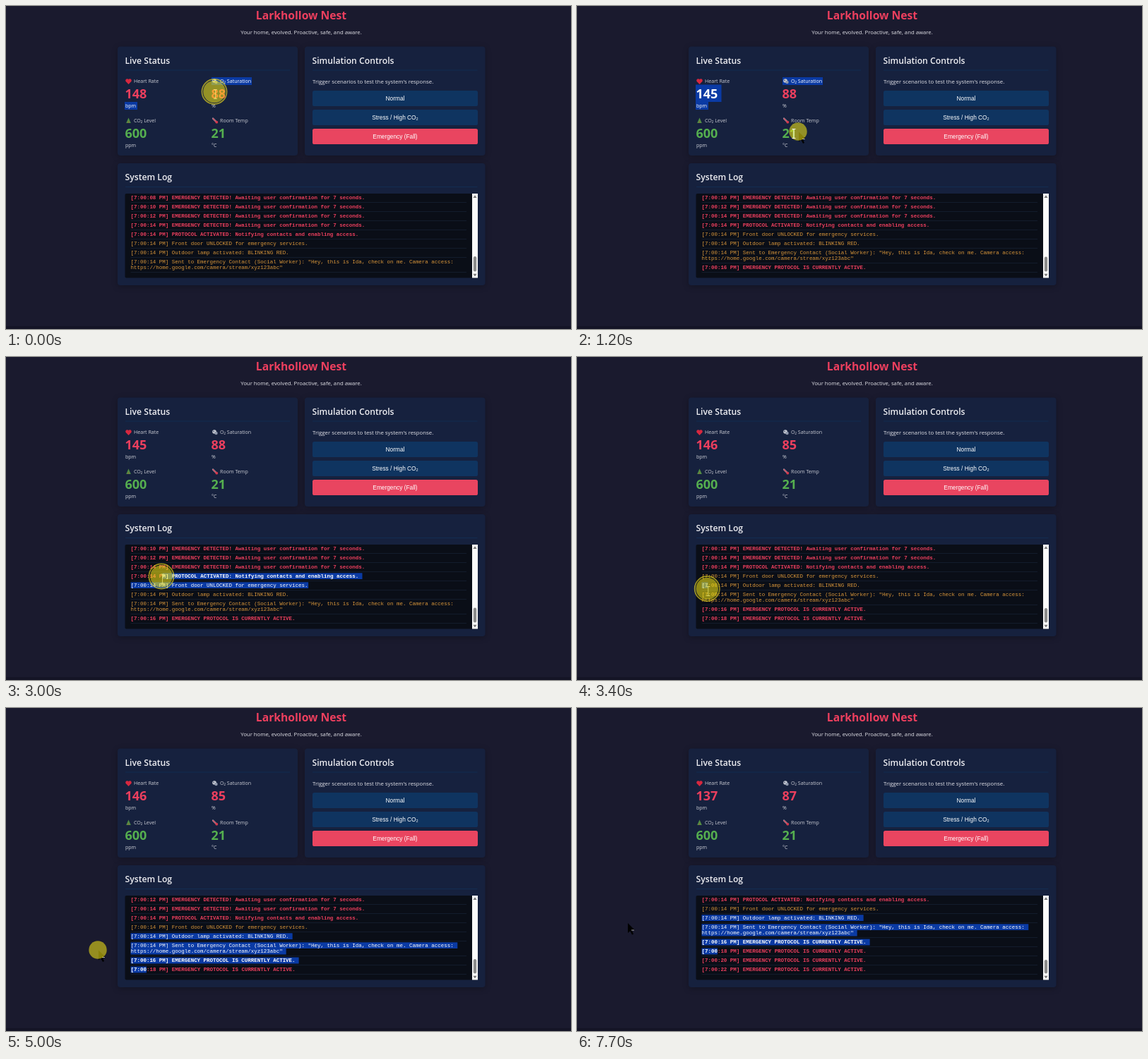
Write an HTML page with a canvas that moves like this. It is 800 px wide and 458 px high and loops after 8000 ms.

```html
<!DOCTYPE html>
<html lang="en">
<head>
<meta charset="utf-8">
<title>Home dashboard</title>
<style>
  html, body { margin: 0; width: 100%; height: 100%; overflow: hidden; background: #1a1a2e; }
  canvas { display: block; width: 800px; height: 458px; }
</style>
</head>
<body>
<canvas id="stage" width="800" height="458"></canvas>
<script>
const ctx = document.getElementById('stage').getContext('2d');
const LOOP = 8000, STEP = 100;
const SANS = '"Open Sans", "Noto Sans", sans-serif';
const ARIAL = '"Liberation Sans", Arial, sans-serif';
const MONO = '"Liberation Mono", "Courier New", monospace';
const RED = '#ec3f5e', GREEN = '#55af4f', ORANGE = '#d9963a', SELECT = '#0a3aa4';

// Log layout
const LOG_X = 176.5, CHAR = 4.493, LAST_Y = 371, ENTRY_H = 13, WRAP_H = 8.4;

function entry(sec, msg, color, rest) {
  const head = { text: `[7:00:${sec} PM] ${msg}`, color, gap: ENTRY_H };
  return rest ? [head, { text: rest, color, gap: WRAP_H }] : [head];
}
const detected = s => entry(s, 'EMERGENCY DETECTED! Awaiting user confirmation for 7 seconds.', RED);
const active = s => entry(s, 'EMERGENCY PROTOCOL IS CURRENTLY ACTIVE.', RED);

const rows = [
  ...['08', '10', '12', '14'].flatMap(detected),
  ...entry('14', 'PROTOCOL ACTIVATED: Notifying contacts and enabling access.', RED),
  ...entry('14', 'Front door UNLOCKED for emergency services.', ORANGE),
  ...entry('14', 'Outdoor lamp activated: BLINKING RED.', ORANGE),
  ...entry('14', 'Sent to Emergency Contact (Social Worker): "Hey, this is Ida, check on me. Camera access:', ORANGE,
    'https://home.google.com/camera/stream/xyz123abc"'),
  ...['16', '18', '20', '22'].flatMap(active)
];
const FIRST_COUNT = 9;
const ANCHOR = { row: 5, col: rows[5].text.length };

// Sensor updates arrive every two seconds
const updates = [1200, 3200, 5200, 7200];
const heart = [148, 145, 146, 140, 137];
const oxygen = [88, 88, 85, 87, 87];

// Pointer path: time, x, y
const path = [
  [0, 295, 121.5], [200, 296, 123], [500, 360, 214], [800, 446, 326], [1000, 398, 268],
  [1200, 313, 178], [1500, 340, 214], [1900, 430, 300], [2200, 459, 318], [2400, 446, 323],
  [2700, 330, 318], [3000, 220, 311], [3300, 184, 318], [3700, 185, 360], [4100, 195, 377],
  [4300, 197, 383], [4500, 198, 377], [4700, 186, 370], [5000, 130, 343], [5400, 71, 304]
];
const DRAG = [2400, 4500];

function pointer(t) {
  const i = path.findIndex(p => p[0] > t);
  if (i < 0) return { x: 71, y: 304.5 };
  const [t0, x0, y0] = path[i - 1], [t1, x1, y1] = path[i];
  const k = (t - t0) / (t1 - t0);
  return { x: x0 + (x1 - x0) * k, y: y0 + (y1 - y0) * k };
}

function text(str, x, y, size, color, weight = 400, family = SANS, align = 'left') {
  ctx.font = `${weight} ${size}px ${family}`;
  ctx.fillStyle = color;
  ctx.textAlign = align;
  ctx.fillText(str, x, y);
}

function rect(x, y, w, h, color, radius = 0) {
  ctx.fillStyle = color;
  ctx.beginPath();
  ctx.roundRect(x, y, w, h, radius);
  ctx.fill();
}

function disc(x, y, r, color) {
  ctx.fillStyle = color;
  ctx.beginPath();
  ctx.arc(x, y, r, 0, Math.PI * 2);
  ctx.fill();
}

function poly(x, y, pts, color) {
  ctx.fillStyle = color;
  ctx.beginPath();
  pts.forEach(([px, py]) => ctx.lineTo(x + px, y + py));
  ctx.fill();
}

function card(x, y, w, h, title) {
  ctx.save();
  ctx.shadowColor = 'rgba(0,0,0,.25)';
  ctx.shadowBlur = 8;
  ctx.shadowOffsetY = 2;
  rect(x, y, w, h, '#16213e', 4);
  ctx.restore();
  text(title, x + 10.5, y + 24, 12.2, '#eeeef2', 600);
  rect(x + 11, y + 33, w - 22, 1, 'rgba(15,52,96,.6)');
}

function stat(x, y, label, value, unit, color, sel = {}) {
  if (sel.label) rect(x, y - 6, 57, 11, SELECT);
  if (sel.value) rect(x - 1, y + 4.5, 36.5, 24.5, SELECT);
  if (sel.unit) rect(x - 1, y + 29, 18, 11, SELECT);
  text(label, x + 12, y + 2.3, 7.1, sel.label ? '#fff' : '#c9cbd3');
  text(value, x - .5, y + 24, 18, sel.value ? '#fff' : color, 700);
  text(unit, x, y + 37, 7, sel.unit ? '#fff' : '#d2d4db');
}

function icons() {
  disc(171.6, 105.5, 2.3, '#d8283f');
  disc(175.4, 105.5, 2.3, '#d8283f');
  poly(173.5, 106, [[-4.2, .5], [4.2, .5], [0, 5]], '#d8283f');
  disc(295, 106, 2.8, '#c9ccd4');
  disc(297.5, 108, 2.2, '#8e97ab');
  disc(294, 105.5, .9, '#5b6480');
  poly(173.5, 158.5, [[0, 0], [3.3, 7.5], [-3.3, 7.5]], '#4f8f45');
  rect(172.8, 163, 1.4, 3, '#8a6a3c');
  ctx.lineCap = 'round';
  ctx.lineWidth = 2.2;
  ctx.strokeStyle = '#b9b4c0';
  ctx.beginPath();
  ctx.moveTo(293, 159.5);
  ctx.lineTo(298, 164.5);
  ctx.stroke();
  ctx.lineWidth = 1.1;
  ctx.strokeStyle = '#d2384c';
  ctx.stroke();
  disc(298.3, 164.7, 1.9, '#d2384c');
}

function button(y, label, color) {
  rect(434, y, 234, 22, color, 2.6);
  text(label, 551, y + 14, 8.32, '#fff', 400, ARIAL, 'center');
}

function rowPositions(count) {
  const ys = [];
  let y = LAST_Y;
  for (let i = count - 1; i >= 0; i--) {
    ys[i] = y;
    y -= rows[i].gap === WRAP_H ? WRAP_H : ENTRY_H;
  }
  return ys;
}

function logSelection(t, ys) {
  if (t < DRAG[0]) return null;
  let focus = { row: 10, col: 5 };
  if (t < DRAG[1]) {
    const p = pointer(t);
    let row = ys.findIndex(y => p.y < y + 6.5);
    if (row < 0) row = ys.length - 1;
    const col = Math.round((p.x - LOG_X) / CHAR);
    focus = { row, col: Math.max(0, Math.min(rows[row].text.length, col)) };
  }
  const forward = focus.row > ANCHOR.row || (focus.row === ANCHOR.row && focus.col > ANCHOR.col);
  return forward ? [ANCHOR, focus] : [focus, ANCHOR];
}

function drawRow(row, i, y, sel) {
  const weight = row.color === RED ? 700 : 400;
  const put = (s, col, color) => text(s, LOG_X + col * CHAR, y + 2.4, 7.488, color, weight, MONO);
  const inside = sel && i >= sel[0].row && i <= sel[1].row;
  const from = inside && i === sel[0].row ? sel[0].col : 0;
  const to = !inside ? 0 : i === sel[1].row ? sel[1].col : row.text.length;
  const newline = inside && i < sel[1].row && from < row.text.length ? 1 : 0;
  if (to > from) rect(LOG_X + from * CHAR, y - 4.4, (to - from + newline) * CHAR, 8.8, SELECT);
  put(row.text.slice(0, from), 0, row.color);
  put(row.text.slice(from, to), from, '#fff');
  put(row.text.slice(to), to, row.color);
}

function drawLog(t, step) {
  rect(168.5, 266, 499.5, 119.5, '#0a0e17', 2);
  const count = FIRST_COUNT + step;
  const ys = rowPositions(count);
  const sel = logSelection(t, ys);
  ctx.save();
  ctx.beginPath();
  ctx.rect(168.5, 266, 491.5, 119.5);
  ctx.clip();
  for (let i = 0; i < count; i++) {
    if (ys[i] < 265) continue;
    const wraps = rows[i + 1] && rows[i + 1].gap === WRAP_H;
    if (!wraps) rect(LOG_X, Math.round(ys[i] + 6.3), 475.5, 1, '#131c2c');
    drawRow(rows[i], i, ys[i], sel);
  }
  ctx.restore();
  rect(660, 266, 8, 119.5, '#fbfbfb');
  const top = 355 + step * .5;
  rect(661.8, top, 4.4, 376.5 - top, '#8b8b8b', 2.2);
  poly(664, 268.3, [[0, 0], [2.6, 3.8], [-2.6, 3.8]], '#777');
  poly(664, 383.6, [[0, 0], [2.6, -3.8], [-2.6, -3.8]], '#777');
}

function beam(x, y, color) {
  rect(x - .5, y - 6, 1, 13, color);
  rect(x - 2.5, y - 6.5, 5, 1, color);
  rect(x - 2.5, y + 6.5, 5, 1, color);
}

function drawPointer(t) {
  const { x, y } = pointer(t);
  const pressed = t < 200 || (t >= DRAG[0] && t < DRAG[1]);
  const halo = t < 5500 || (t >= 7200 && t < 7700);
  if (pressed) {
    beam(x + 1.5, y + 3, 'rgba(235,235,235,.7)');
  } else {
    poly(x + 1, y + .5, [[0, 0], [0, 14], [3.2, 11.2], [6, 16.5], [8, 15.5], [5.8, 10.4], [10, 10]], '#000');
    rect(x + 6, y + 10, 4, 1, '#a9a9b0');
  }
  if (halo) {
    disc(x, y, pressed ? 15.8 : 12.7, 'rgba(255,240,20,.54)');
    if (pressed) {
      ctx.strokeStyle = 'rgba(232,214,30,.66)';
      ctx.lineWidth = 1.7;
      ctx.beginPath();
      ctx.arc(x, y, 17.6, 0, Math.PI * 2);
      ctx.stroke();
    }
  }
  if (t === 1200) beam(x - 6, y + 2.5, '#f4f4f4');
}

function draw(t) {
  const step = updates.filter(u => t >= u).length;
  const picked = t < DRAG[0];
  rect(0, 0, 800, 458, '#1a1a2e');
  rect(0, 454, 800, 4, '#141425');

  text('Larkhollow Nest', 418, 18.7, 15.7, RED, 700, SANS, 'center');
  text('Your home, evolved. Proactive, safe, and aware.', 418, 40, 7.78, '#e4e4ea', 400, SANS, 'center');

  card(158, 57.5, 255, 154.5, 'Live Status');
  card(423, 57.5, 255.5, 154.5, 'Simulation Controls');
  card(158, 223, 520.5, 173, 'System Log');

  stat(169, 107, 'Heart Rate', heart[step], 'bpm', RED, { value: picked && t >= 200, unit: picked });
  stat(291, 107, 'O₂ Saturation', oxygen[step], '%', RED, { label: picked });
  stat(169, 163, 'CO₂ Level', 600, 'ppm', GREEN);
  stat(291, 163, 'Room Temp', 21, '°C', GREEN);
  icons();

  text("Trigger scenarios to test the system's response.", 434, 109.8, 7.8, '#e4e4ea');
  button(120, 'Normal', '#0f3460');
  button(147, 'Stress / High CO₂', '#0f3460');
  button(174, 'Emergency (Fall)', '#e94560');

  drawLog(t, step);
  drawPointer(t);
}

const start = performance.now();
function tick() {
  const t = (performance.now() - start) % LOOP;
  draw(Math.floor(t / STEP) * STEP);
  requestAnimationFrame(tick);
}
tick();
</script>
</body>
</html>
```
